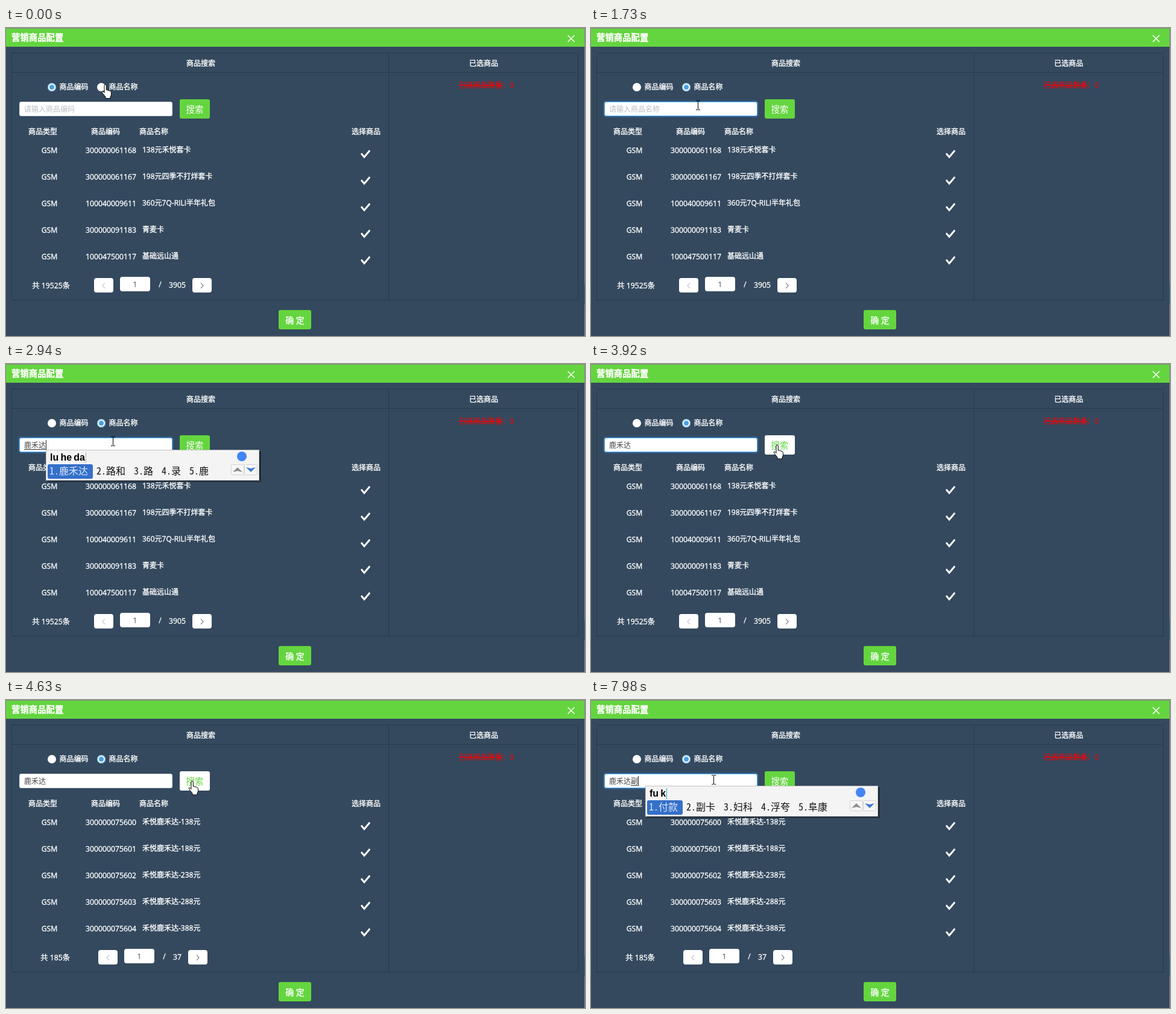
Animation of 960x510 px, one loop 8000 ms. Source, as an HTML page:

```html
<!DOCTYPE html>
<html lang="zh-CN">
<head>
<meta charset="utf-8">
<style>
  html, body { margin: 0; width: 100%; height: 100%; overflow: hidden; background: #868686; }
  svg { display: block; width: 960px; height: 510px; }
  text { font-family: "Open Sans", "Noto Sans CJK SC", "Noto Sans CJK", sans-serif; white-space: pre; }
  text[fill="#fff"] { stroke: #fff; stroke-width: .35px; }
  .cand { font-family: "Noto Sans Mono CJK SC", "Noto Sans CJK SC", monospace; }
  .pinyin { font-family: "Liberation Sans", sans-serif; font-weight: bold; }
</style>
</head>
<body>
<svg id="stage" viewBox="0 0 960 510"></svg>
<script>
const LOOP = 8000;
const GREEN = '#64d53f', NAVY = '#34495e', LINE = '#293b4d', BLUE = '#4aa0e0', DIM_BLUE = '#466f8b';
const PLAN = '鹿禾达';

const allGoods = {
  total: 19525, pages: 3905, inset: 0,
  rows: [['300000061168', '138元禾悦套卡'], ['300000061167', '198元四季不打烊套卡'],
    ['100040009611', '360元7Q-RILI半年礼包'], ['300000091183', '青麦卡'], ['100047500117', '基础远山通']]
};
const foundGoods = {
  total: 185, pages: 37, inset: 7,
  rows: [138, 188, 238, 288, 388].map((price, i) => ['30000007560' + i, `禾悦${PLAN}-${price}元`])
};

const ime = (typed, cands, inline) => {
  const words = cands.split(' ');
  return { typed: typed.replace(/ /g, '\u2009'), words, inline: inline || words[0] };
};

// Each step changes part of the state and lasts until overridden.
const steps = [
  [0, { sel: 0, hint: '编码', cursor: ['hand', 158.5, 93], focus: 0, hover: 0, caret: false,
    text: '', ime: null, empty: false, goods: allGoods }],
  [500, { sel: .5, hint: '名称' }],
  [630, { sel: 1 }],
  [770, { cursor: ['arrow', 172, 107] }],
  [900, { cursor: ['beam', 177.5, 125] }],
  [1050, { focus: .25 }],
  [1170, { focus: .5 }],
  [1320, { focus: .75, cursor: ['beam', 177.5, 128] }],
  [1450, { focus: 1, caret: true }],
  [1730, { caret: false }],
  [2160, { caret: true, ime: ime('l', '了 来 里 老 两') }],
  [2280, { ime: ime('lu', '路 录 鹿 陆 露') }],
  [2420, { ime: ime('lu h', '炉火 陆航 芦花 录好 录活') }],
  [2670, { ime: ime('lu he', '路和 路 录 鹿 陆') }],
  [2820, { ime: ime('lu he d', PLAN + ' 路和 路 录 鹿') }],
  [2940, { ime: ime('lu he da', PLAN + ' 路和 路 录 鹿') }],
  [3240, { ime: null, text: PLAN }],
  [3520, { cursor: ['beam', 225, 130] }],
  [3640, { cursor: ['beam', 263.5, 133] }],
  [3790, { cursor: ['hand', 302.5, 133.5], hover: .5, caret: false }],
  [3920, { hover: 1 }],
  [4070, { focus: .5 }],
  [4200, { focus: 0, empty: true }],
  [4630, { empty: false, goods: foundGoods }],
  [7010, { cursor: ['beam', 253.5, 132] }],
  [7160, { cursor: ['beam', 203.5, 132], hover: .5, focus: .25 }],
  [7280, { hover: 0, focus: .5 }],
  [7440, { focus: 1, caret: true }],
  [7840, { ime: ime('f', '副 付 富 负 服') }],
  [7980, { ime: ime('fu k', '付款 副卡 妇科 浮夸 阜康', '副') }]
];

const rect = (x, y, w, h, fill, extra = '') =>
  `<rect x="${x}" y="${y}" width="${w}" height="${h}" fill="${fill}" ${extra}/>`;
const path = (d, stroke, width = 1, extra = 'fill="none"') =>
  `<path d="${d}" stroke="${stroke}" stroke-width="${width}" ${extra}/>`;
const dot = (x, y, r, fill, extra = '') => `<circle cx="${x}" cy="${y}" r="${r}" fill="${fill}" ${extra}/>`;
// y is the vertical middle of the glyphs
const label = (x, y, str, fill = '#fff', size = 12, extra = '') =>
  `<text x="${x}" y="${y + size * .37}" font-size="${size}" fill="${fill}" ${extra}>${str}</text>`;
const MID = 'text-anchor="middle"', END = 'text-anchor="end"', BOLD = 'font-weight="bold"';
const mix = (a, b, k) => `rgb(${a.map((v, i) => Math.round(v + (b[i] - v) * k))})`;

const pen = document.createElement('canvas').getContext('2d');
pen.font = 'bold 16px "Liberation Sans", sans-serif';

function page() {
  const ink = '#2e3136', small = '#33363b';
  const box = (x, y, w, h) => rect(x + .5, y + .5, w, h, '#878787', 'rx="4" stroke="#777"');
  const button = (x, y, w) => rect(x, y, w, 32, DIM_BLUE, 'rx="4"');
  const star = (x, y) => label(x, y + 2, '*', '#8a2a18', 14);
  const pale = '#929a9f';
  return rect(0, 0, 960, 510, '#868686')
    + button(368, 223, 92) + label(414, 239, '移除配置', pale, 14, MID)
    + star(72, 328) + label(83, 328, '营销活动名称：', ink, 14)
    + box(194, 314, 790, 31) + label(202, 331, '禾川渠道长住居民节点推广201705', small)
    + label(203, 390, '外部导入', ink, 14) + label(275, 390, '营销标签', DIM_BLUE, 14)
    + label(347, 390, '全网客户', ink, 14) + rect(275, 405, 56, 2, DIM_BLUE)
    + label(83, 439, '营销客户名单：', ink, 14)
    + box(194, 425, 516, 31) + label(202, 442, `禾川${PLAN}副卡推广口径`, small)
    + button(723, 425, 78) + label(762, 442, '选择标签', pale, 14, MID)
    + button(809, 425, 170) + label(820, 442, '营销名单拆分 (未拆分)', pale, 14)
    + star(30, 499) + label(41, 499, '营销目标客户群描述：', ink, 14)
    + box(194, 485, 790, 60) + label(202, 502, '禾川柳溪区营业部长住居民，月资费28元及以上，异网用户。', small);
}

function radio(x, name, on) {
  return dot(x, 98, 7, '#fff')
    + (on ? dot(x, 98, 6.4, 'none', `stroke="${BLUE}" stroke-width="1.1" opacity="${.8 * on}"`)
      + dot(x, 98, 4 * on, BLUE) : '')
    + label(x + 12.5, 98, name);
}

function list({ total, pages, inset, rows }) {
  const pager = (x, d, color) => rect(x, 414, 32, 24, '#fff', 'rx="4"')
    + path(`M${x + 16 - 2 * d} 422l${4 * d} 4.5l${-4 * d} 4.5`, color, 1.1);
  return rows.map(([code, name], i) => {
    const y = 202 + 44 * i;
    return label(72, y, 'GSM', '#fff', 12.25, MID) + label(132, y, code, '#fff', 12.25) + label(226, y, name)
      + path(`M589.8 ${y + 6.7}l4.2 5l8.4-10`, '#fff', 3, 'fill="none" stroke-linecap="round"');
  }).join('')
    + label(106, 426, `共 ${total}条`, '#fff', 12.25, END)
    + pager(146 + inset, -1, '#bbb') + pager(309 - inset, 1, '#666')
    + rect(189 + inset, 412, 50, 24, '#fff', 'rx="4"') + label(214 + inset, 425, '1', '#444', 12, MID)
    + label(255.5 + inset, 425, '/', '#fff', 12, MID) + label(298 - inset, 425, pages, '#fff', 12.25, END);
}

function input(s) {
  const value = s.text + (s.ime ? s.ime.inline : '');
  const end = 30 + 12 * value.length;
  const border = mix([215, 221, 228], [92, 173, 240], s.focus);
  return (s.focus > .5 ? rect(21, 121, 256, 26, 'none', `rx="4" stroke="#2d8cf0" stroke-width="2" opacity="${.3 * s.focus}"`) : '')
    + rect(22.5, 122.5, 253, 23, '#fff', `rx="2.5" stroke="${border}"`)
    + (value ? label(30, 134.5, value, '#444') : label(30, 135, `请输入商品${s.hint}`, '#bbbec4'))
    + (s.ime ? rect(30 + 12 * s.text.length, 141, 12 * s.ime.inline.length, 1, '#333') : '')
    + (s.caret ? rect(end, 126, 1, 16, '#222') : '');
}

function imeWindow({ typed, words }, text) {
  const x = 30 + 12 * (text.length + words[0].length);
  const w = 226 + 16 * words.join('').length;
  const right = x + w;
  let cx = x + 6;
  const cands = words.map((word, i) => {
    const fill = i ? '#111' : '#dce9ff';
    const out = label(cx, 177, i + 1 + '.', fill, 16, 'class="cand"')
      + label(cx + 16, 177, word, fill, 16, 'class="cand"');
    cx += 30 + 16 * word.length;
    return out;
  }).join('');
  const arrow = (ax, d, fill) => rect(ax - 10.5, 166.5, 21, 17, '#f6f6f6', 'rx="2" stroke="#d4d4d4"')
    + `<path d="M${ax - 8} ${175 + 4 * d}l8 ${-8 * d}l8 ${8 * d}l-8 ${-2 * d}z" fill="${fill}"/>`;
  return rect(x + 3, 145, w, 51, '#000', 'opacity=".2"') + rect(x + 2, 144, w, 50, '#000', 'opacity=".4"')
    + rect(x + .5, 142.5, w - 1, 50, '#f4f4f4', 'stroke="#c4c4c4"')
    + rect(x + 3, 166, 27 + 16 * words[0].length, 24, '#3570c9', 'rx="3"')
    + `<text x="${x + 7}" y="160" font-size="16" class="pinyin">${typed}</text>`
    + rect(Math.round(x + 8 + pen.measureText(typed).width), 146, 1, 18, text ? '#19b5d8' : '#b5ae92')
    + dot(right - 29, 153, 8, '#4285f4') + cands
    + arrow(right - 36, 1, '#8c8c8c') + arrow(right - 14, -1, '#3a78d0');
}

const cursors = {
  hand: path('M4.5 14V2.5a1.7 1.7 0 0 1 3.4 0V9.5l2.2 .4 2.4 .6 2 .8q1.5 .8 1.5 2.5v3q0 2 -1.5 4.2v2.5h-8v-2.5L2 15.5Q0 12.5 1 11.8q1.5 -.8 3.5 2.2z', '#000', 1, 'fill="#fff"'),
  arrow: path('M0 0V16L4 12.5L6.5 18L9 17L6.5 11.5H11.5z', '#000', 1, 'fill="#fff"'),
  beam: path('M-3.5 -7.5h3M.5 -7.5h3M0 -7V7M-3.5 7.5h3M.5 7.5h3', '#000')
};

function draw(s) {
  const bottom = s.empty ? 182 : 450;
  const green = [100, 213, 63], white = [255, 255, 255];
  const [shape, cx, cy] = s.cursor;
  return page()
    + rect(0, 1, 959, bottom + 61, NAVY) + rect(0, 1, 959, 30, GREEN)
    + label(9, 16, '营销商品配置', '#fff', 14.4, BOLD)
    + path('M931.5 12l11 11m0 -11l-11 11', '#fff', 1.5)
    + path(`M9.5 41.5H948.5V${bottom + .5}H9.5zM9.5 73.5H948.5M634.5 41.5V${bottom}`, LINE)
    + label(323, 58.5, '商品搜索', '#fff', 12, MID) + label(792, 58.5, '已选商品', '#fff', 12, MID)
    + label(751, 95, '<tspan text-decoration="line-through">已选商品数量</tspan>：0', '#f00')
    + radio(76, '商品编码', 1 - s.sel) + radio(158, '商品名称', s.sel)
    + input(s)
    + rect(288, 118, 50, 32, mix(green, white, s.hover), 'rx="3"')
    + label(313, 135, '搜索', mix(white, green, s.hover), 14.4, MID + ' font-weight="500"')
    + label(37, 172, '商品类型') + label(141, 172, '商品编码') + label(221, 172, '商品名称') + label(573, 172, '选择商品')
    + (s.empty ? '' : list(s.goods))
    + rect(452, bottom + 17, 54, 32, GREEN, 'rx="3"') + label(479, bottom + 34, '确 定', '#fff', 14, MID + ' font-weight="500"')
    + (s.ime ? imeWindow(s.ime, s.text) : '')
    + `<g transform="translate(${cx} ${cy})">${cursors[shape]}</g>`;
}

const stage = document.getElementById('stage');
let shown = 0;
function tick() {
  const t = performance.now() % LOOP;
  const past = steps.filter(([at]) => at <= t);
  if (past.length !== shown) {
    shown = past.length;
    stage.innerHTML = draw(Object.assign({}, ...past.map(step => step[1])));
  }
  requestAnimationFrame(tick);
}
tick();
</script>
</body>
</html>
```
